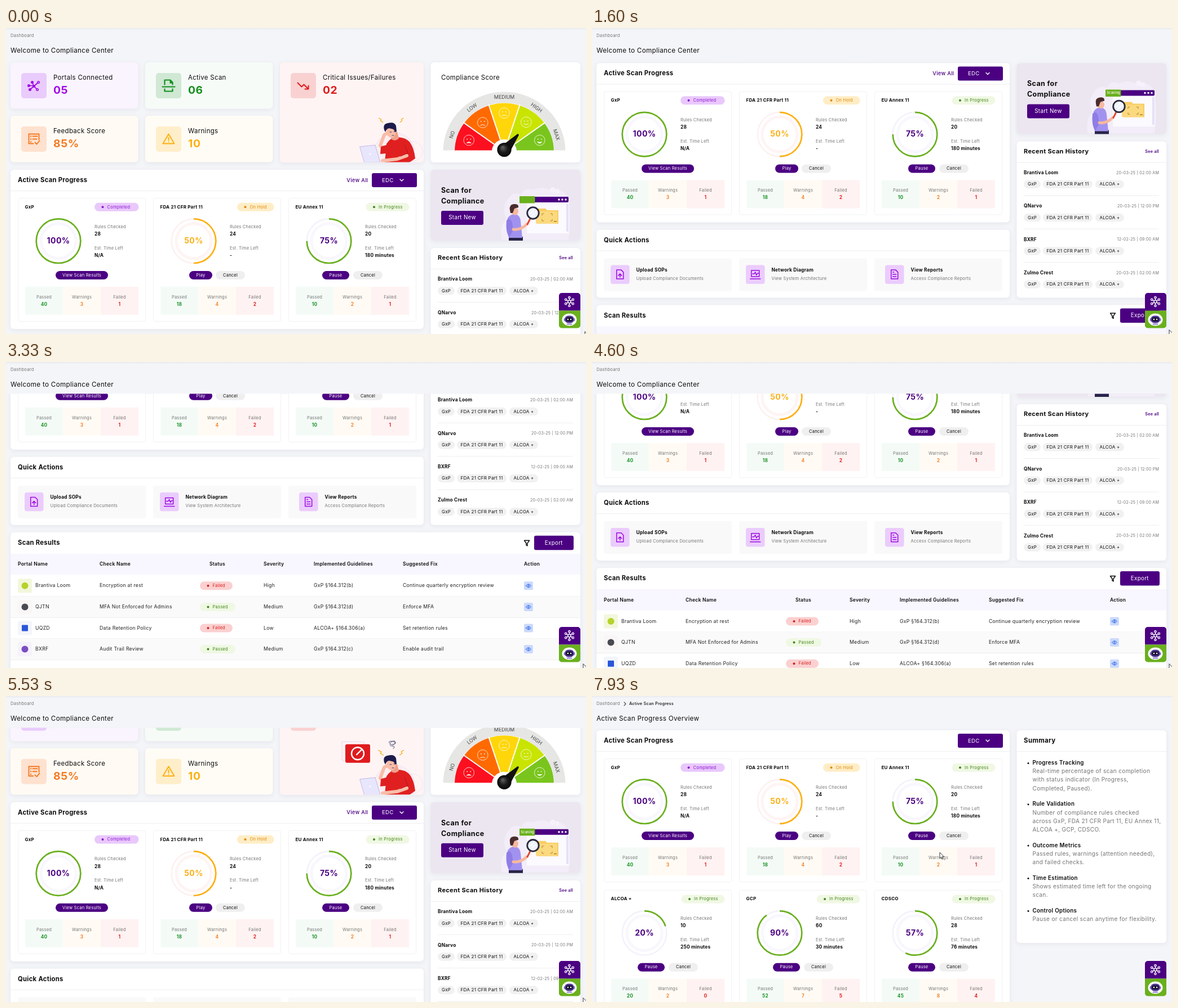
An HTML page with a canvas for the animation above (8000 ms loop, 1029 by 544 pixels).

```html
<!DOCTYPE html>
<html lang="en">
<head>
<meta charset="utf-8">
<title>Compliance Center</title>
<style>
html, body { margin: 0; width: 100%; height: 100%; overflow: hidden; background: #f4f5f8; }
canvas { display: block; width: 1029px; height: 544px; }
</style>
</head>
<body>
<canvas id="stage"></canvas>
<script>
const W = 1029, H = 544, LOOP = 8000, NOTCH = 63.2;
const INDIGO = '#4b0082', INK = '#0c0c0c', GREY = '#757575', GREEN = '#6ab01e';
const canvas = document.getElementById('stage');
const ctx = canvas.getContext('2d');
const dpr = window.devicePixelRatio || 1;
canvas.width = W * dpr;
canvas.height = H * dpr;

const clamp = v => Math.max(0, Math.min(1, v));
const ramp = (t, a, b) => clamp((t - a) / (b - a));
const ease = p => p * p * (3 - 2 * p);
const mix = (a, b, p) => a + (b - a) * p;

// ---- drawing helpers ----
function text(s, x, y, size, color = INK, weight = 400, align = 'left') {
  ctx.font = `${weight} ${size}px Inter, "Open Sans", sans-serif`;
  ctx.letterSpacing = `${size * 0.03}px`;
  ctx.textAlign = align;
  ctx.textBaseline = 'middle';
  ctx.fillStyle = color;
  ctx.fillText(s, x, y);
}
function box(x, y, w, h, r, fill, stroke) {
  ctx.beginPath();
  ctx.roundRect(x, y, w, h, r);
  if (fill) { ctx.fillStyle = fill; ctx.fill(); }
  if (stroke) { ctx.strokeStyle = stroke; ctx.lineWidth = 1; ctx.stroke(); }
}
function card(x, y, w, h, fill = '#fff') {
  ctx.save();
  ctx.shadowColor = 'rgba(50,50,100,.08)';
  ctx.shadowBlur = 9 * dpr;
  ctx.shadowOffsetY = 2 * dpr;
  box(x, y, w, h, 6, fill);
  ctx.restore();
}
function shape(d, fill) {
  ctx.fillStyle = fill;
  ctx.fill(new Path2D(d));
}
function line(d, color, width = 1) {
  ctx.strokeStyle = color;
  ctx.lineWidth = width;
  ctx.lineCap = ctx.lineJoin = 'round';
  ctx.stroke(new Path2D(d));
}
function dot(x, y, r, fill) {
  ctx.beginPath();
  ctx.arc(x, y, r, 0, 7);
  ctx.fillStyle = fill;
  ctx.fill();
}
function ring(x, y, r, color, width, from = 0, part = 1) {
  ctx.beginPath();
  ctx.arc(x, y, r, from, from + part * Math.PI * 2);
  ctx.strokeStyle = color;
  ctx.lineWidth = width;
  ctx.lineCap = 'butt';
  ctx.stroke();
}
function at(x, y, draw, scale = 1, angle = 0) {
  ctx.save();
  ctx.translate(x, y);
  ctx.rotate(angle);
  ctx.scale(scale, scale);
  draw();
  ctx.restore();
}
const rule = (x, y, w, color = '#eeeef1') => box(x, y, w, 1, 0, color);
function pill(s, x, y, w, fill, color) {
  box(x, y - 7.5, w, 15, 7.5, fill);
  text(s, x + w / 2, y, 7.5, color, 400, 'center');
}

const STATUS = {
  'Completed': [78.5, '#e9c8fc', '#8c14cf'],
  'On Hold': [65.5, '#ffedc6', '#e08a0c'],
  'In Progress': [77, '#f0f8e4', '#43861a'],
  'Failed': [58, '#fbd0d0', '#d81f1f'],
  'Passed': [63, '#eff8e3', '#43861a']
};
function badge(s, x, y) {
  const [w, fill, color] = STATUS[s];
  box(x, y - 7.5, w, 15, 7.5, fill);
  dot(x + 14.5, y, 2, color);
  text(s, x + 22.5, y, 7.5, color);
}

// ---- icons, each centred on 0,0 ----
const icons = {
  nodes(c) {
    line('M-7 7L0 1L6 7M0 1L-3 -6M0 1L8 -6M-9 0H0', c, 1.7);
    for (const [x, y] of [[-7, 7], [0, 1], [6, 7], [-3, -6], [8, -6], [-9, 0]]) dot(x, y, 2.5, c);
    dot(8, -6, 1, '#e6c8fa');
    dot(6, 7, 1, '#e6c8fa');
  },
  scan(c) {
    line('M-7 -2V-10H3L7 -6V-2M-7 6V10H7V6M-11 2H11', c, 2.2);
    shape('M2 -10L8 -4H2Z', c);
  },
  drop(c) { line('M-10 -5L-3 2L1 -2L9 6M9 0V6H3', c, 2); },
  form(c) {
    line('M-1 8H-9V-9H9V1M-6 -5H-5M-2 -5H6M-6 0H-5M-2 0H5M-6 5H-5M2 6L5 9L10 3', c, 1.9);
  },
  warn(c) { line('M0 -9L10 8H-10ZM0 -3V2M0 5V5.1', c, 1.9); },
  upload(c) { line('M-6 -8H2L6 -4V8H-6ZM0 5V-1M-3 2L0 -1L3 2', c, 1.5); },
  diagram(c) { line('M-7 -7H7V4H-7ZM-9 8H9M-5 -1H-2L0 -4L2 1L4 -2H6', c, 1.5); },
  report(c) { line('M-6 -8H2L6 -4V8H-6ZM-3 0H3M-3 4H3M-3 -4H-1', c, 1.5); }
};

// ---- stat cards ----
const STATS = [
  [8, 61, 'Portals Connected', '05', 'nodes', '#faf4ff', '#e9cbfc', '#a00ae6'],
  [247, 61, 'Active Scan', '06', 'scan', '#f6fbf8', '#d0e8d4', '#15901f'],
  [8, 156, 'Feedback Score', '85%', 'form', '#fffbf4', '#ffe1cf', '#f57a22'],
  [247, 156, 'Warnings', '10', 'warn', '#fffcf5', '#ffeeca', '#fcb010'],
  [486, 61, 'Critical Issues/Failures', '02', 'drop', '#fff4f4', '#f9d1d1', '#e01a1a']
];
function statCard([x, y, label, value, icon, bg, tint, color]) {
  card(x, y, x === 486 ? 255 : 226.5, x === 486 ? 178 : 82.5, bg);
  box(x + 19, y + 19, 45, 45, 5, tint);
  at(x + 41.5, y + 41.5, () => icons[icon](color));
  text(label, x + 76, y + 27.5, 11.4);
  text(value, x + 76, y + 50, 19.3, color, 700);
}

function worker(t) {
  const pulse = 0.875 - 0.125 * Math.cos(t * Math.PI / 1000);
  const skin = '#f8bda8', red = '#e02020', navy = '#1c1b4a';
  ctx.save();
  ctx.beginPath();
  ctx.rect(486, 61, 255, 177.5);
  ctx.clip();
  dot(689, 222, 36, '#fdeef1');
  ring(689, 222, 36, '#e6dff6', 0.8);
  ring(722, 219, 17, '#e6dff6', 0.8);
  shape('M672 240L675 206Q682 195 692 194Q710 194 717 204Q724 214 726 232L714 240Z', red);
  shape('M683 187L694 184L697 196Q690 203 683 197Z', '#ee9f8a');
  shape('M675 178Q681 171 690 176Q694 188 687 195Q679 196 675 188Z', skin);
  shape('M671 181Q668 170 678 169Q689 166 692 174L693 184L690 185Q689 179 683 179Q676 176 673 185Z', navy);
  line('M678 186L671 190L664 209L674 217', skin, 6);
  shape('M665 211L681 206L684 222L664 224Z', red);
  line('M711 227L694 233L668 236', skin, 6);
  line('M707 208L713 222L700 228', '#a8121c', 0.8);
  line('M681 185H684M688 184H690M685 191H688', navy, 0.8);
  shape('M628 211L655 208L664 239H636Z', '#e8e6fc');
  line('M628 211L655 208L664 239H636Z', '#a9a4dc', 0.7);
  dot(646, 224, 1.5, '#fff');
  at(665, 164, () => line('M-5 -5L1 -2L-1 1L5 5', '#f6a800', 1.4), pulse);
  at(702, 164, () => line('M4 -5L-1 -2L1 1L-4 5', '#f6a800', 1.4), pulse);
  if (t > 4600) {
    line('M680 147Q678 142 686 144Q696 146 688 149Q678 151 683 145Q692 140 690 147Q684 156 681 150M686 153Q692 152 687 157', '#30305c', 0.8);
    const s = ease(ramp(t, 4650, 4850)), cut = ramp(t, 5250, 5700);
    at(624, 165.5, () => {
      ctx.setLineDash([2, 2]);
      box(-28, -21, 39, 33, 0, null, '#d9cdf2');
      ctx.setLineDash([]);
      box(-22, -16.5, 44, 33, 3, '#df1b1f');
      ring(0, 0, 11, '#fff', 2.4);
      const end = mix(7.5, -7.5, cut);
      if (cut) line(`M7.5 -7.5L${end} ${-end}`, '#fff', 2.4);
    }, s);
  }
  ctx.restore();
}

function gauge() {
  const cx = 884, cy = 219.5, flat = 0.977, step = Math.PI / 5;
  // label, colour, mouth bend, face distance
  const sectors = [['NO', '#fc1020', -3, 66], ['LOW', '#ff6a00', -2.5, 65], ['MEDIUM', '#ffd60a', 0, 70], ['HIGH', '#c9e400', 2, 66], ['MAX', '#7ac51d', 3.5, 66]];
  card(753.5, 61, 265.5, 178);
  text('Compliance Score', 772, 88.5, 11.4);
  ctx.save();
  ctx.beginPath();
  ctx.rect(760, 100, 250, 117.5);
  ctx.clip();
  ctx.translate(cx, cy);
  ctx.scale(1, flat);
  ring(0, 0, 98.5, '#e6e6e5', 20, Math.PI, 0.5);
  sectors.forEach(([, color], i) => ring(0, 0, 55, color, 66, Math.PI + i * step, 0.1));
  for (let i = 1; i < 5; i++) {
    const a = Math.PI + i * step, c = Math.cos(a), s = Math.sin(a);
    line(`M${20 * c} ${20 * s}L${89 * c} ${89 * s}`, '#fff', 2);
  }
  ctx.restore();
  sectors.forEach(([name, , mood, r], i) => {
    const a = (i - 2) * step;
    at(cx + 97 * Math.sin(a), cy - 96 * Math.cos(a), () => {
      ctx.font = '9.4px Roboto, sans-serif';
      ctx.letterSpacing = '0px';
      ctx.textAlign = 'center';
      ctx.textBaseline = 'middle';
      ctx.fillStyle = '#4c4c4c';
      ctx.fillText(name, 0, 0);
    }, 1, a);
    at(cx + r * Math.sin(a), cy - r * flat * Math.cos(a), () => {
      ring(0, 0, 9.3, 'rgba(255,255,255,.85)', 0.9);
      dot(-3, -2, 0.9, '#fff');
      dot(3, -2, 0.9, '#fff');
      const y = 4 - mood / 3;
      line(`M-4 ${y}Q0 ${y + mood} 4 ${y}`, '#fff', 0.9);
      if (i % 4 === 0) shape(`M-4 ${y}Q0 ${y + mood * 1.6} 4 ${y}Z`, '#fff');
    });
  });
  shape('M880 209L908 188Q911 189 909 192L893 222Z', '#111');
  const hub = ctx.createRadialGradient(881, 212, 1, 884, 217, 13);
  hub.addColorStop(0, '#5b5b5b');
  hub.addColorStop(0.5, '#1c1c1c');
  hub.addColorStop(1, '#080808');
  dot(884, 216.5, 12.6, hub);
}

// ---- scan progress ----
const SCANS = [
  ['GxP', 'Completed', 100, '28', 'N/A', 'View Scan Results', 40, 3, 1],
  ['FDA 21 CFR Part 11', 'On Hold', 50, '24', '-', 'Play', 18, 4, 2],
  ['EU Annex 11', 'In Progress', 75, '20', '180 minutes', 'Pause', 10, 2, 1],
  ['ALCOA +', 'In Progress', 20, '10', '250 minutes', 'Pause', 20, 2, 0],
  ['GCP', 'In Progress', 90, '60', '30 minutes', 'Pause', 52, 7, 5],
  ['CDSCO', 'In Progress', 57, '28', '76 minutes', 'Pause', 45, 8, 4]
];
const TILES = [['Passed', '#f4fbf7', '#179324'], ['Warnings', '#fffbf4', '#f5822a'], ['Failed', '#fff2f2', '#e31b1b']];
function scanCard(x, y, [name, status, pct, rules, left, action, ...counts]) {
  const held = status === 'On Hold', cx = x + 72, cy = y + 76.7;
  box(x + 0.5, y + 0.5, 226, 219, 3, '#fff', '#f2f2f4');
  text(name, x + 12.5, y + 16.3, 8, INK, 700);
  badge(status, x + 214.5 - STATUS[status][0], y + 16.3);
  ring(cx, cy, 39.3, held ? '#fdf0f1' : '#f4f1fb', 2.6);
  ring(cx, cy, 31, held ? '#fff4f4' : '#f9f7fe', 5);
  ring(cx, cy, 39.3, held ? '#fdb012' : GREEN, 2.7, -Math.PI / 2, pct / 100);
  text(pct + '%', cx, cy, 14, held ? '#fbb018' : INDIGO, 700, 'center');
  text('Rules Checked', x + 136, y + 51.3, 7.5, GREY);
  text(rules, x + 136, y + 64.3, 8.3, INK, 700);
  text('Est. Time Left', x + 136, y + 89.3, 7.4, GREY);
  text(left, x + 136, y + 102.3, 8.3, INK, 700);
  const by = y + 137.5;
  if (action.length > 5) pill(action, x + 67, by, 93, INDIGO, '#fff');
  else {
    const play = action === 'Play';
    pill(action, x + (play ? 64 : 60), by, play ? 41 : 48, INDIGO, '#fff');
    pill('Cancel', x + (play ? 111 : 115), by, 52, '#efefef', INK);
  }
  TILES.forEach(([label, fill, color], i) => {
    box(x + 13 + i * 67, y + 158, 67, 50, 0, fill);
    text(label, x + 46.5 + i * 67, y + 176.5, 7.5, GREY, 400, 'center');
    text(String(counts[i]), x + 46.5 + i * 67, y + 189.3, 8.3, color, 700, 'center');
  });
}
function scanHeader(y) {
  text('Active Scan Progress', 21, y + 18.5, 11.2, INK, 700);
  box(649, y + 6, 80, 25, 3, INDIGO);
  text('EDC', 667, y + 18.7, 9.6, '#fff');
  line(`M699 ${y + 17}L702 ${y + 20}L705 ${y + 17}`, '#fff', 1.4);
  rule(8, y + 37, 733);
}

function scanPromo(t) {
  card(753.5, 252, 265.5, 126, '#ece6f1');
  text('Scan for', 772, 289, 12.5, INK, 700);
  text('Compliance', 772, 308, 12.5, INK, 700);
  box(772, 325, 75, 25, 3, INDIGO);
  text('Start New', 809.5, 337.5, 9.8, '#fff', 400, 'center');
  shape('M880 377Q874 352 888 340Q878 318 892 302Q900 290 914 296Q920 282 936 288Q950 280 968 289Q990 284 996 302Q1004 332 998 377Z', '#f2edf8');
  dot(970, 288, 5, '#f6f2fb');
  dot(978, 290, 4, '#f6f2fb');
  box(924, 306, 75, 59, 2, '#fbfaff');
  box(924, 300, 74, 10, 2, INDIGO);
  for (let i = 0; i < 3; i++) dot(981 + i * 6, 305, 1.7, '#fff');
  box(994, 312, 4, 50, 1, '#e8e1f6');
  shape('M943 321H957L960 324H980V348H943Z', '#f9cd62');
  box(940, 326, 38, 22, 2, '#fbd97f');
  line('M951 333V330H954M966 330H969V333M969 340V343H966M954 343H951V340', '#b07d1c', 0.9);
  box(972, 343, 5, 1.5, 0, '#b07d1c');
  if (t > 6300) dot(977, 320, 3.6 + Math.sin((t - 6400) / 150) * 0.8, '#5eb31f');
  box(911, 299, 27.5, 12.5, 1, GREEN);
  if (t > 400) text('Scaning', 925, 305.3, 5.8, '#fff', 500, 'center');
  // person with a magnifier
  shape('M892 371H917V378H892Z', '#262347');
  shape('M890 338Q895 330 904 331Q912 333 913 343L916 373H892L888 357Z', '#a292f0');
  shape('M888 342Q894 335 898 346L900 360L893 372Q886 363 888 342Z', '#8f7de6');
  shape('M898 321Q908 318 909 325Q909 331 904 333L898 331Z', '#f6b8a0');
  shape('M894 324Q892 314 901 313Q910 312 909 319L902 321L899 329H895Z', '#4a2c2e');
  line('M900 358Q912 360 924 349', '#f6b8a0', 5);
  line('M930 339L925 349', '#e5442e', 3);
  dot(935, 329, 10, '#eef2fc');
  line('M930 330L937 323M933 334L941 326', '#fff', 1.5);
  ring(935, 329, 10.3, '#2a2a3e', 2.8);
}

// ---- history, actions, results ----
const HISTORY = [['Brantiva Loom', '20-03-25 | 02:00 AM'], ['QNarvo', '20-03-25 | 12:00 PM'], ['BXRF', '12-02-25 | 09:00 AM'], ['Zulmo Crest', '20-03-25 | 02:00 AM']];
function history() {
  card(753.5, 391, 265.5, 278);
  text('Recent Scan History', 766, 409, 11, INK, 700);
  text('See all', 1006, 409, 7.3, INDIGO, 600, 'right');
  rule(753.5, 428, 265.5);
  HISTORY.forEach(([name, date], i) => {
    const y = 447 + i * 59.4;
    text(name, 766, y, 8.3, INK, 700);
    text(date, 1006, y, 7.1, GREY, 400, 'right');
    for (const [s, x, w] of [['GxP', 766, 30], ['FDA 21 CFR Part 11', 800, 88], ['ALCOA +', 893, 51]]) {
      box(x, y + 13, w, 14.5, 7.2, '#f1f1f2');
      text(s, x + w / 2, y + 20.3, 8, INK, 400, 'center');
    }
    if (i < 3) rule(766, y + 40, 240);
  });
}
const ACTIONS = [
  [21, 33, 'Upload SOPs', 'Upload Compliance Documents', 'upload'],
  [261, 273, 'Network Diagram', 'View System Architecture', 'diagram'],
  [501, 520, 'View Reports', 'Access Compliance Reports', 'report']
];
function quickActions() {
  card(8, 548, 733, 121);
  text('Quick Actions', 21, 567, 11.2, INK, 700);
  rule(8, 585, 733);
  for (const [x, ix, title, note, icon] of ACTIONS) {
    box(x, 599, 227, 58, 3, '#f9f9f9');
    box(ix, 611, 33.5, 33.5, 4, '#ebccfd');
    at(ix + 16.7, 627.7, () => icons[icon]('#9a0ae0'));
    text(title, ix + 45.5, 620, 8.3, INK, 700);
    text(note, ix + 45.5, 635, 7.6, GREY);
  }
}
const COLS = [21, 166, 361, 457, 546, 704, 919];
const HEADS = ['Portal Name', 'Check Name', 'Status', 'Severity', 'Implemented Guidelines', 'Suggested Fix', 'Action'];
const ROWS = [
  ['Brantiva Loom', 'Encryption at rest', 'Failed', 'High', 'GxP §164.312(b)', 'Continue quarterly encryption review', '#f2f7dc', '#b5d32b'],
  ['QJTN', 'MFA Not Enforced for Admins', 'Passed', 'Medium', 'GxP §164.312(d)', 'Enforce MFA', '#faf6f6', '#4a4a52'],
  ['UQZD', 'Data Retention Policy', 'Failed', 'Low', 'ALCOA+ §164.306(a)', 'Set retention rules', '#f3f5fb', '#2a56d8'],
  ['BXRF', 'Audit Trail Review', 'Passed', 'Medium', 'GxP §164.312(c)', 'Enable audit trail', '#f6f2fb', '#7a4fc0']
];
function results() {
  card(8, 682, 1011, 300);
  text('Scan Results', 21, 701, 11.2, INK, 700);
  line('M919.5 696.5H928.5L925 701.5V706L923 704.5V701.5Z', INK, 1.5);
  box(937, 688, 70, 25.5, 3, INDIGO);
  text('Export', 971.8, 701, 9.8, '#fff', 400, 'center');
  box(8, 720, 1011, 37.5, 0, '#f8f6fe');
  HEADS.forEach((s, i) => text(s, COLS[i], 739, 8.5, INK, 600));
  ROWS.forEach(([name, check, status, level, guide, fix, tint, mark], i) => {
    const y = 777 + i * 37.6;
    if (i % 2) box(8, y - 18.8, 1011, 37.6, 0, '#fafafa');
    rule(8, y + 18.3, 1011);
    box(21, y - 12.5, 25, 25, 3, tint);
    if (i === 2) box(28, y - 5.5, 11, 11, 1, mark);
    else dot(33.5, y, 6, mark);
    text(name, 52, y, 8.7, '#222');
    text(check, 166, y, 8.7, '#222');
    badge(status, 344, y);
    [level, guide, fix].forEach((s, k) => text(s, COLS[k + 3], y, 8.7, '#222'));
    box(919, y - 7.5, 16, 15, 2, '#cbdafc');
    line(`M922.5 ${y}Q927 ${y - 6} 931.5 ${y}Q927 ${y + 6} 922.5 ${y}Z`, '#2a62e8', 1);
    ring(927, y, 1.4, '#2a62e8', 1);
  });
}

// ---- pages ----
function dashboard(t) {
  STATS.forEach(statCard);
  worker(t);
  gauge();
  card(8, 252, 733, 283);
  scanHeader(252);
  text('View All', 642.5, 270.7, 9.4, INDIGO, 500, 'right');
  SCANS.slice(0, 3).forEach((s, i) => scanCard(21 + i * 240, 302, s));
  scanPromo(t);
  history();
  quickActions();
  results();
}
const SUMMARY = [
  ['Progress Tracking', 'Real-time percentage of scan completion', 'with status indicator (In Progress,', 'Completed, Paused).'],
  ['Rule Validation', 'Number of compliance rules checked', 'across GxP, FDA 21 CFR Part 11, EU Annex 11,', 'ALCOA +, GCP, CDSCO.'],
  ['Outcome Metrics', 'Passed rules, warnings (attention needed),', 'and failed checks.'],
  ['Time Estimation', 'Shows estimated time left for the ongoing', 'scan.'],
  ['Control Options', 'Pause or cancel scan anytime for flexibility.']
];
function overview() {
  card(8, 61, 733, 540);
  scanHeader(61);
  SCANS.forEach((s, i) => scanCard(21 + i % 3 * 240, i < 3 ? 111 : 344.7, s));
  card(753.5, 61, 265.5, 378);
  text('Summary', 766, 80, 11.5, INK, 700);
  rule(753.5, 98, 265.5);
  let y = 119;
  for (const [head, ...lines] of SUMMARY) {
    dot(774, y + 0.5, 1.5, INK);
    text(head, 781.5, y, 9.8, INK, 600);
    lines.forEach(s => text(s, 781.5, y += 15.2, 10.1, '#757575'));
    y += 27.7;
  }
}

function floaters() {
  box(981, 471, 38, 31.5, [5, 5, 0, 0], INDIGO);
  box(981, 502.5, 38, 31, [0, 0, 5, 5], GREEN);
  at(999.5, 486.5, () => {
    for (let i = 0; i < 6; i++) {
      const a = i * Math.PI / 3 + Math.PI / 6, c = Math.cos(a), s = Math.sin(a);
      line(`M${3 * c} ${3 * s}L${6 * c} ${6 * s}`, '#fff', 1.3);
      ring(7.3 * c, 7.3 * s, 1.7, '#fff', 1.3);
    }
    ring(0, 0, 2.6, '#fff', 1.4);
  });
  at(999.5, 518.5, () => {
    ctx.beginPath();
    ctx.ellipse(0, 0, 13, 11, 0, 0, 7);
    ctx.fillStyle = '#fff';
    ctx.fill();
    box(-10, -3, 20, 6, 2.5, '#8d7bd0');
    box(-8, -7, 16, 13, 6, '#4b3590');
    box(-6, -4, 12, 7, 3.5, '#17112e');
    dot(-2.6, -0.5, 1.2, '#fff');
    dot(2.6, -0.5, 1.2, '#fff');
    box(-5, 7, 10, 2, 1, '#8d7bd0');
  });
}

// ---- timeline: scroll notches and pointer path ----
const SCROLL = [[0, 0], [930, 1], [1200, 2], [1470, 3], [1730, 4], [2670, 5], [3330, 6], [4600, 5], [4670, 4], [4800, 3], [4930, 2], [5000, 1], [5600, 0]];
const PATH = [[0, 1027, 540], [870, 1024, 537], [6130, 1024, 537], [6400, 703.5, 335.5], [7150, 612, 275], [7929, 612, 275], [7930, 617, 278.5], [LOOP, 617, 278.5]];
const OPENED = 7730;

function pointer(t) {
  const i = PATH.findIndex((p, k) => k && t <= p[0]);
  const [a, x0, y0] = PATH[i - 1], [b, x1, y1] = PATH[i];
  const p = ease(ramp(t, a, b));
  const hand = t > 7050 && t < OPENED;
  const d = hand
    ? 'M0 1Q1.5 -1 2.5 1V5L7 6Q8.5 7 8 9L7 13H1L-3 8Q-3 6 -1 7L0 8Z'
    : 'M0 0V10L2.4 7.9L4.1 11.7L5.7 11L4 7.3H7.2Z';
  at(mix(x0, x1, p), mix(y0, y1, p), () => {
    shape(d, '#fff');
    line(d, '#222', 0.9);
  });
}

function draw(t) {
  const inner = t >= OPENED;
  const notch = SCROLL.reduce((n, [from, v]) => t >= from ? v : n, 0);
  ctx.setTransform(dpr, 0, 0, dpr, 0, 0);
  ctx.fillStyle = '#f4f5f8';
  ctx.fillRect(0, 0, W, H);
  ctx.save();
  ctx.beginPath();
  ctx.rect(0, 56.5, W, H);
  ctx.clip();
  if (inner) overview();
  else {
    ctx.translate(0, -notch * NOTCH);
    dashboard(t);
  }
  ctx.restore();
  const edge = ctx.createLinearGradient(0, 0, 0, 4);
  edge.addColorStop(0, '#e9eaee');
  edge.addColorStop(1, '#f4f5f8');
  ctx.fillStyle = edge;
  ctx.fillRect(0, 0, W, 4);
  text('Dashboard', 8, 14, 7.7, '#777');
  if (inner) {
    line('M57 11L60 14L57 17', '#444', 1.1);
    text('Active Scan Progress', 66, 14, 7.3, INK, 500);
  }
  text(inner ? 'Active Scan Progress Overview' : 'Welcome to Compliance Center', 8, 41, 11.6);
  floaters();
  pointer(t);
}

const start = performance.now();
function tick() {
  draw((performance.now() - start) % LOOP);
  requestAnimationFrame(tick);
}
tick();
</script>
</body>
</html>
```
